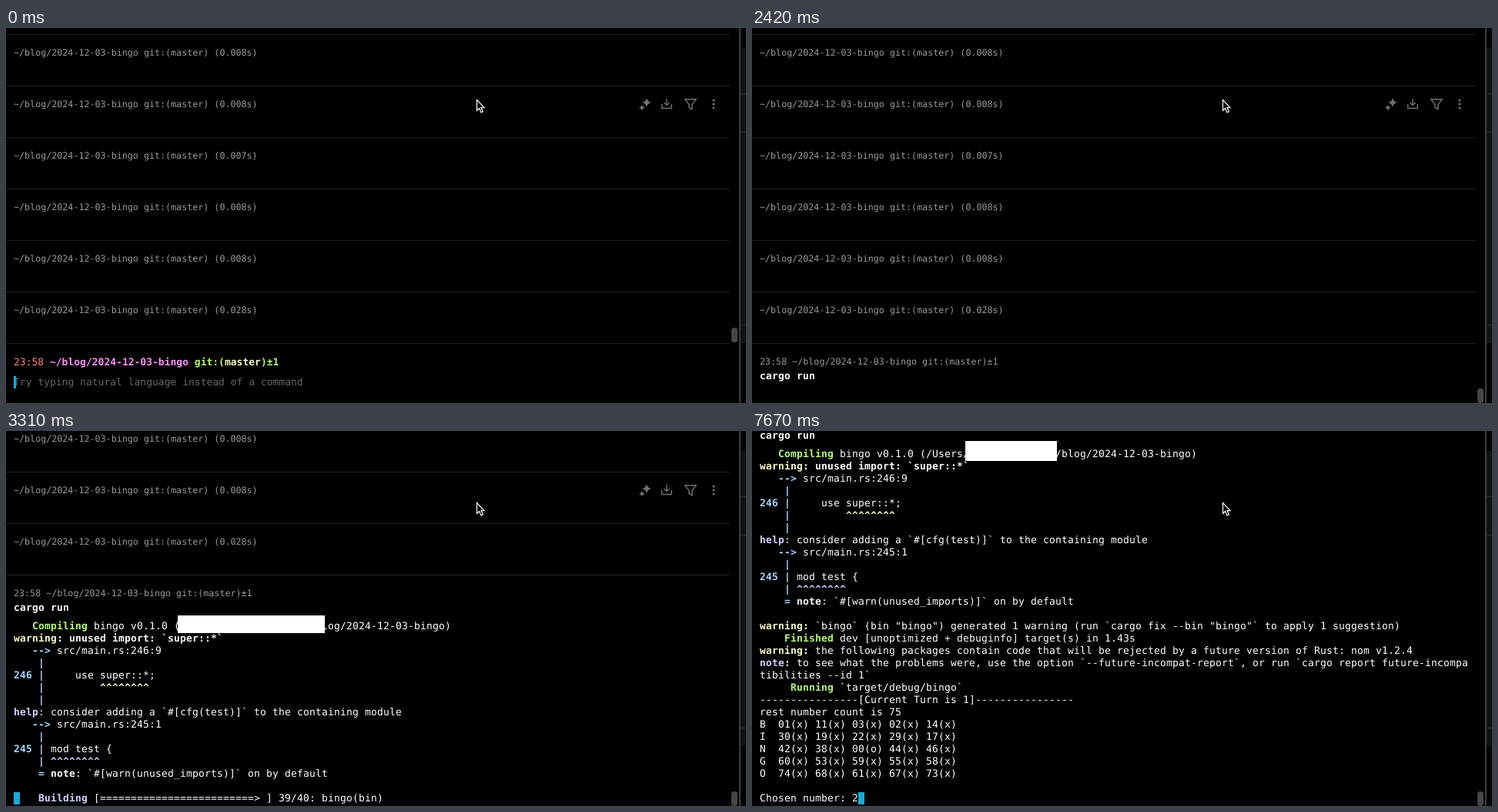
These frames come from a looping animation (961x488 px, 8000 ms). An HTML page:

```html
<!DOCTYPE html>
<html lang="en">
<head>
<meta charset="utf-8">
<title>Terminal: cargo run</title>
<style>
  html, body { margin: 0; width: 100%; height: 100%; overflow: hidden; background: #000; }
  svg { display: block; }
  text {
    font: 13px "DejaVu Sans Mono", "Liberation Mono", monospace;
    white-space: pre;
    text-rendering: geometricPrecision;
    fill: #fff;
  }
  .label { font-size: 11.7px; fill: #999; }
  .out { letter-spacing: .1733px; } /* 8px cells */
  .w, .r, .g, .y, .b, .m, .c { font-weight: bold; }
  .w { fill: #fff; }
  .r { fill: #ff8272; }
  .g { fill: #b4fa72; }
  .y { fill: #fefdc2; }
  .b { fill: #a5d5fe; }
  .m { fill: #ff8ffd; }
  .c { fill: #d0d1fe; }
  .time { fill: #ff8272; }
  .hint { fill: #666; }
  .caret { fill: #19aad8; }
  .sep { fill: #1f1f1f; }
  .icons { fill: none; stroke: #707070; stroke-width: 1.4; }
  .icons .solid { fill: #707070; stroke: none; }
</style>
</head>
<body>
<svg width="961" height="488" viewBox="0 0 961 488">
  <rect width="961" height="488"/>
  <g id="world">
    <g id="history"></g>
    <g id="icons" class="icons">
      <path class="solid" d="M832 -8Q833 -3 838 -2Q833 -1 832 4Q831 -1 826 -2Q831 -3 832 -8Z
        M826 1Q826.7 4 830 4.7Q826.7 5.4 826 8.5Q825.3 5.4 822 4.7Q825.3 4 826 1Z"/>
      <path d="M851.7 0V5.5H864.3V0M858 -7V1.5M854.5 -2L858 1.5L861.5 -2"/>
      <path d="M881.8 -6.3H896.2L891 .5V6.5L887 4.5V.5Z"/>
      <g class="solid">
        <circle cx="919" cy="-5" r="1.6"/><circle cx="919" cy="0" r="1.6"/><circle cx="919" cy="5" r="1.6"/>
      </g>
    </g>
    <g id="run"></g>
  </g>
  <g id="input"></g>
  <rect id="mask" fill="#fff"/>
  <rect id="thumb" x="942" width="8" height="19" rx="3.5" fill="#464646"/>
  <rect x="954" y="26" width="7" height="384" fill="#121212"/>
  <path d="M954 85.5H961M954 135.5H961M954 386.5H961" stroke="#2c2c2c"/>
  <rect x="952" width="2" height="488" fill="#3c3c3c"/>
  <path d="M611.5 93.5V107.3L614.6 104.5L617 109.9L619.4 108.8L617 103.6H621Z" fill="#000" stroke="#fff" stroke-width="1.2"/>
</svg>
<script>
const LOOP = 8000, LEFT = 10, ROW = 67, LINE = 16, CELL = 8, INPUT_CELL = 7.8267;
const $ = id => document.getElementById(id);

// <x>...</> marks a run of text in the style of class x
const markup = s => s.replace(/<(\w)>(.*?)<\/>/g, '<tspan class="$1">$2</tspan>');
const text = (y, s, cls = '', x = LEFT) =>
  `<text class="${cls}" x="${x}" y="${y}" xml:space="preserve">${markup(s)}</text>`;
const rect = (x, y, w, h, cls) =>
  `<rect class="${cls}" x="${x}" y="${y}" width="${w}" height="${h}"/>`;

const build = [
  '   <g>Compiling</> bingo v0.1.0 (/Users/' + ' '.repeat(14) + '/blog/2024-12-03-bingo)',
  '<y>warning</><w>: unused import: `super::*`</>',
  '   <b>--></> src/main.rs:246:9',
  '    <b>|</>',
  '<b>246 |</>     use super::*;',
  '    <b>|</>         <y>^^^^^^^^</>',
  '    <b>|</>',
  '<c>help</>: consider adding a `#[cfg(test)]` to the containing module',
  '   <b>--></> src/main.rs:245:1',
  '    <b>|</>',
  '<b>245 |</> mod test {',
  '    <b>|</> <c>^^^^^^^^</>',
  '    <b>=</> <w>note</>: `#[warn(unused_imports)]` on by default',
  ''
];
const progress = '    <c>Building</> [' + '='.repeat(25) + '> ] 39/40: bingo(bin)';
const finished = [
  ...build,
  '<y>warning</><w>:</> `bingo` (bin "bingo") generated 1 warning (run `cargo fix --bin "bingo"` to apply 1 suggestion)',
  '    <g>Finished</> dev [unoptimized + debuginfo] target(s) in 1.43s',
  '<y>warning</><w>:</> the following packages contain code that will be rejected by a future version of Rust: nom v1.2.4',
  '<c>note</><w>:</> to see what the problems were, use the option `--future-incompat-report`, or run `cargo report future-incompa',
  'tibilities --id 1`',
  '     <g>Running</> `target/debug/bingo`'
];
const dashes = '-'.repeat(16);
const game = [
  ...finished,
  dashes + '[Current Turn is 1]' + dashes,
  'rest number count is 75',
  'B  01(x) 11(x) 03(x) 02(x) 14(x)',
  'I  30(x) 19(x) 22(x) 29(x) 17(x)',
  'N  42(x) 38(x) 00(o) 44(x) 46(x)',
  'G  60(x) 53(x) 59(x) 55(x) 58(x)',
  'O  74(x) 68(x) 61(x) 67(x) 73(x)',
  ''
];

// Each step changes only the listed properties; col is the block cursor's column
const steps = [
  [0, { typed: '', hint: 'Try typing natural language instead of a command', caret: true, scroll: 1 }],
  [450, { caret: false }],
  [990, { caret: true }],
  [1250, { typed: 'ca', hint: 'rgo fmt' }],
  [1430, { typed: 'car', hint: 'go fmt' }],
  [1610, { typed: 'carg', hint: 'o fmt', error: true }],
  [1700, { typed: 'cargo', hint: ' fmt', error: false }],
  [1880, { typed: 'cargo ', hint: 'fmt' }],
  [2150, { typed: 'cargo r', hint: 'un' }],
  [2240, { typed: 'cargo ru', hint: 'n' }],
  [2330, { typed: 'cargo run', hint: '' }],
  [2420, { out: [''] }],
  [2510, { scroll: 0 }],
  [2780, { col: 0 }],
  [3130, { out: [build[0], progress], mask: [223, 448, 191, 23] }],
  [3310, { out: [...build, progress], mask: [223, 240, 191, 23] }],
  [4290, { out: [...finished, ''], mask: [228, 141, 168, 24] }],
  [4560, { out: [...game, 'Chosen number: '], col: 15, mask: [277, 16, 121, 21] }],
  [7670, { out: [...game, 'Chosen number: 2'], col: 16, mask: [277, 13, 119, 26] }]
];

const path = '~/blog/2024-12-03-bingo';
$('history').innerHTML = [8, 8, 7, 8, 8, 28].map((ms, i) =>
  text(37 + ROW * i, `${path} git:(master) (0.0${String(ms).padStart(2, '0')}s)`, 'label')
).join('') + Array.from({ length: 7 }, (_, i) => rect(0, 9 + ROW * i, 940, 1, 'sep')).join('');

function inputView({ typed, hint, caret, error }) {
  const x = LEFT + typed.length * INPUT_CELL;
  return text(439, `23:58 <m>${path}</> <g>git:(</><y>master</><g>)±1</>`, 'time')
    + text(465, typed) + text(465, hint, 'hint', x)
    + (error ? `<path d="M10 468H${x}" stroke="#ff8272" stroke-width="2" stroke-dasharray="4 2"/>` : '')
    + (caret ? rect(x, 453, 3, 16, 'caret') : '');
}

function runView({ out, col }) {
  const last = 470 + (out.length - 1) * LINE;
  return text(439, `23:58 ${path} git:(master)±1`, 'label')
    + text(458, '<w>cargo run</>', 'out')
    + out.map((s, i) => text(482 + i * LINE, s, 'out')).join('')
    + (col === undefined ? '' : rect(LEFT + col * CELL, last, 8, 16, 'caret'));
}

function show(state) {
  const { out, mask = [0, 0, 0, 0] } = state;
  const scroll = state.scroll + (out ? (out.length - 1) * LINE : 0);
  const hovered = Math.min(6, Math.floor((92 + scroll) / ROW));
  $('world').setAttribute('transform', `translate(0 ${-scroll})`);
  $('icons').setAttribute('transform', `translate(0 ${33 + ROW * hovered})`);
  $('run').innerHTML = out ? runView(state) : '';
  $('input').innerHTML = out ? '' : inputView(state);
  $('thumb').setAttribute('y', out ? 469 : 390);
  ['x', 'y', 'width', 'height'].forEach((name, i) => $('mask').setAttribute(name, mask[i]));
}

let shown = 0;
function tick() {
  const t = performance.now() % LOOP;
  const past = steps.filter(([at]) => at <= t);
  if (past.length !== shown) {
    shown = past.length;
    show(Object.assign({}, ...past.map(([, change]) => change)));
  }
  requestAnimationFrame(tick);
}
tick();
</script>
</body>
</html>
```
